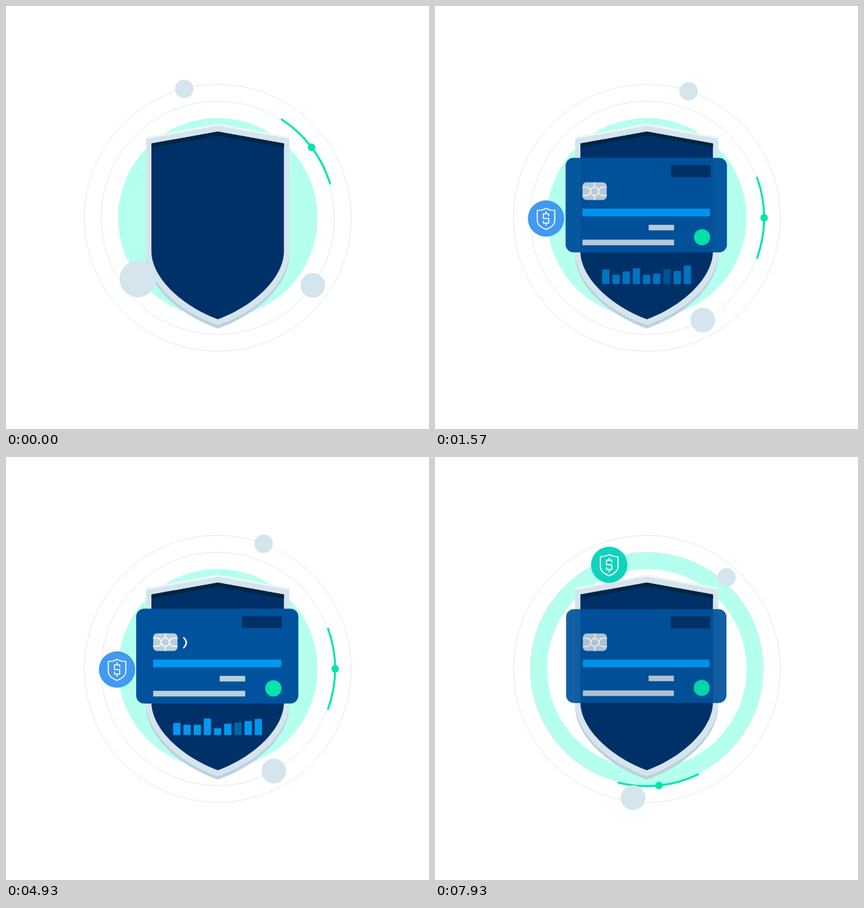
An HTML page that plays this animation: 640 px wide and 640 px high, repeating every 8 s.

```html
<!DOCTYPE html>
<html lang="en">
<head>
<meta charset="utf-8">
<title>Card protection</title>
<style>
  html, body { margin: 0; width: 100%; height: 100%; overflow: hidden; background: #fff; }
  svg { display: block; width: 100vw; height: 100vh; }
</style>
</head>
<body>
<svg viewBox="0 0 640 640">
  <defs>
    <path id="frame" d="M212 201L320.5 181L428.5 201V372C428.5 415 383 461 320.5 483C258 461 212 415 212 372Z"/>
  </defs>

  <circle id="disc" cx="320.5" cy="320.5" r="151" fill="#b5ffee"/>
  <circle id="hole" cx="320.5" cy="320.5" r="0" fill="#fff"/>
  <g fill="none" stroke="#e3e9ee">
    <circle cx="320.5" cy="320.5" r="202"/>
    <circle cx="320.5" cy="320.5" r="176.5"/>
  </g>

  <g id="sweep" fill="#00e5ad">
    <path d="M487.3 259.8A177.5 177.5 0 0 1 487.3 381.2" fill="none" stroke="#00e5ad" stroke-width="3" stroke-linecap="round"/>
    <circle cx="498" cy="320.5" r="5.7"/>
  </g>

  <use href="#frame" y="5" fill="#bdd0de"/>
  <use href="#frame" y="-3" fill="#eff5f8"/>
  <use href="#frame" fill="#d5e5ed"/>
  <path d="M220 208L320.5 190L420.5 208V371C420.5 410 377 453 320.5 474C264 453 220 410 220 371Z" fill="#003068"/>
  <path d="M220 208L320.5 190L420.5 208V214L320.5 196L220 214Z" fill="#002444"/>

  <circle id="small" r="14" fill="#d5e5ed"/>
  <circle id="medium" r="18.7" fill="#d5e5ed"/>
  <g id="coin">
    <circle id="coinFace" r="27.5"/>
    <g id="coinIcon" fill="none" stroke="#fff" stroke-width="1.6" stroke-linejoin="round">
      <path d="M-13.3 -12.3Q-5 -12.3 0 -15.5Q5 -12.3 13.3 -12.3V3.5Q13 11.5 0 16.5Q-13 11.5 -13.3 3.5Z"/>
      <path d="M4 -3.5V-7H-4V0H4V7H-4V3.5M0 -11V-7M0 7V11"/>
    </g>
  </g>

  <g id="bars" fill="#0099f0"></g>

  <g id="card">
    <rect x="197" y="229.5" width="245.3" height="143.5" rx="12" fill="#00529c"/>
    <rect x="357" y="240.5" width="60.3" height="18.3" fill="#003166"/>
    <rect x="222.7" y="266.7" width="36.8" height="26.8" rx="6" fill="#bdcfdc"/>
    <g fill="none" stroke="#fff" stroke-width="1.5">
      <circle cx="241" cy="280.3" r="6.2"/>
      <path d="M241 266.7V274M241 286.5V293.5M222.7 274H228.5A6.3 6.3 0 0 1 228.5 286.6H222.7M259.5 274H253.5A6.3 6.3 0 0 0 253.5 286.6H259.5"/>
    </g>
    <rect x="222.7" y="306.6" width="193.8" height="11.6" fill="#0099f0"/>
    <rect x="323.3" y="331.2" width="38.6" height="8.4" fill="#bdcfdc"/>
    <rect x="222.7" y="353.8" width="139.2" height="8.5" fill="#bdcfdc"/>
    <circle cx="404.5" cy="350" r="12.3" fill="#00e5ad"/>
  </g>
  <path id="wave" fill="none" stroke="#fff" stroke-width="2.2" stroke-linecap="round"/>
</svg>

<script>
const LOOP = 8000, CENTER = 320.5, BASELINE = 420.7;
const WAVES = ['M269 273.5Q276.5 281 269 288.5', 'M272.5 270.5Q282 281 272.5 291.5'];
const BAR_TOPS = [395, 403.5, 398, 394, 403, 402, 394.5, 398, 389];
const GREY = [213, 229, 237], BLUE = [66, 153, 240], GREEN = [0, 229, 173];

const el = id => document.getElementById(id);
const [disc, hole, sweep, small, medium, coin, coinFace, coinIcon, barGroup, card, wave] =
  ['disc', 'hole', 'sweep', 'small', 'medium', 'coin', 'coinFace', 'coinIcon', 'bars', 'card', 'wave'].map(el);

const span = (t, from, to) => Math.min(1, Math.max(0, (t - from) / (to - from)));
const smooth = u => u * u * (3 - 2 * u);
const mix = (a, b, p) => a.map((v, i) => Math.round(v + (b[i] - v) * p));

// Bezier timing with flat ends: handles at (x1, 0) and (x2, 1).
function ease(x, x1, x2) {
  let lo = 0, hi = 1;
  for (let i = 0; i < 24; i++) {
    const u = (lo + hi) / 2, v = 1 - u;
    if (3 * x1 * u * v * v + 3 * x2 * u * u * v + u * u * u < x) lo = u; else hi = u;
  }
  return smooth(lo);
}

// Angles run clockwise from the top.
function orbit(node, angle, radius, turn = 0) {
  const a = angle * Math.PI / 180;
  const x = CENTER + radius * Math.sin(a), y = CENTER - radius * Math.cos(a);
  node.setAttribute('transform', `translate(${x} ${y}) rotate(${turn})`);
}

const bars = BAR_TOPS.map((top, i) => {
  const bar = document.createElementNS('http://www.w3.org/2000/svg', 'rect');
  bar.setAttribute('x', 253 + i * 15.42);
  bar.setAttribute('width', 11);
  if (i === 6) bar.setAttribute('opacity', .5);
  return barGroup.appendChild(bar);
});

function drawOrbits(t) {
  const sweepEase = start => 120 * ease(span(t, start, start + 2460), .33, .07);
  const arriving = sweepEase(-902) - 120;
  const leave = power => Math.max(0, (t - 7000) / 930) ** power;

  sweep.setAttribute('transform', `rotate(${arriving + sweepEase(7015)} ${CENTER} ${CENTER})`);
  orbit(coin, 269.6 + arriving + 70.4 * leave(1.36), 152.5 + 14.8 * leave(2.2), arriving);
  orbit(medium,
    119.6 + 31.7 * smooth(span(t, -600, 1600)) + 34.7 * leave(2.55),
    176.3 + 19.8 * leave(1.57));
  orbit(small,
    -14.9 + 35 * ease(span(t, -140, 1880), .44, .6) + 20.9 * leave(2.7),
    201.5 - 17.9 * leave(2.4));

  const color = mix(mix(GREY, BLUE, span(t, 500, 1200)), GREEN, span(t, 7400, 8100));
  coinFace.setAttribute('fill', `rgb(${color})`);
  coinIcon.setAttribute('opacity', span(t, 400, 750));

  disc.setAttribute('r', 151 + 25.5 * smooth(span(t, 7200, 7930)));
  hole.setAttribute('r', 151 * smooth(span(t, 7250, 7930)));
}

function drawBars(t) {
  // The swing rests briefly halfway through the scene.
  const swing = t < 4230 ? t - 4230 : Math.max(0, t - 4310);
  const phase = 2 * Math.PI * swing / 957;
  const drops = [4.5 - 4.8 * Math.cos(phase), 1 - 2 * Math.cos(2 * phase)];
  bars.forEach((bar, i) => {
    const top = BAR_TOPS[i] + drops[i % 2];
    bar.setAttribute('y', top);
    bar.setAttribute('height', BASELINE - top);
  });
  barGroup.setAttribute('opacity', span(t, 1150, 1800) - span(t, 7500, 7800));
}

function drawCard(t) {
  const shown = 1 - (1 - span(t, 950, 1710)) ** 2 - span(t, 7750, 8400) ** 2;
  const scale = .86 + .14 * shown;
  card.setAttribute('opacity', shown);
  card.setAttribute('transform', `translate(319.6 301.3) scale(${scale}) translate(-319.6 -301.3)`);

  const beat = (t + 1070) % 1930;
  const step = t < 1800 || t > 7700 || beat >= 900 ? -1 : beat < 350 ? 0 : 1;
  wave.setAttribute('d', WAVES[step] || '');
}

function frame() {
  const t = performance.now() % LOOP;
  drawOrbits(t);
  drawBars(t);
  drawCard(t);
  requestAnimationFrame(frame);
}
frame();
</script>
</body>
</html>
```
